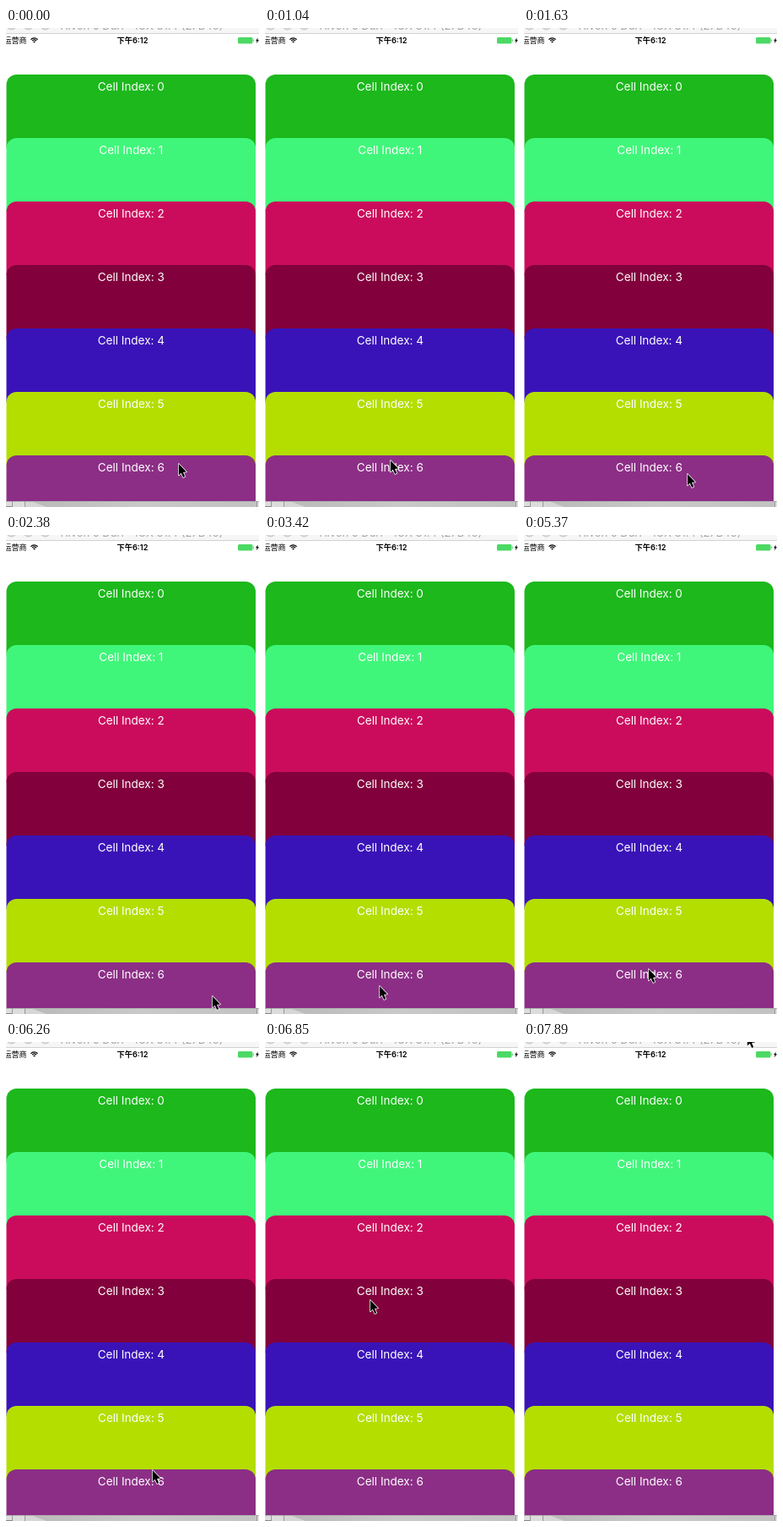
An HTML page with a canvas that plays this animation: 300 px wide and 566 px high, repeating every 8000 ms.

```html
<!DOCTYPE html>
<html lang="zh">
<head>
<meta charset="utf-8">
<style>
html, body { margin: 0; width: 100%; height: 100%; overflow: hidden; background: #fff; }
canvas { display: block; width: 300px; height: 566px; }
</style>
</head>
<body>
<canvas id="stage"></canvas>
<script>
const W = 300, H = 566, LOOP = 8000;
const canvas = document.getElementById('stage');
const ctx = canvas.getContext('2d');
const ratio = window.devicePixelRatio || 1;
canvas.width = W * ratio;
canvas.height = H * ratio;
ctx.scale(ratio, ratio);

const CELLS = ['#1cb81c', '#40f67a', '#cb0c5c', '#82003c', '#3a13b8', '#b3de00', '#8c2e86'];
const CELL_TOP = 55, CELL_STEP = 75, SCREEN_END = 559;

// Each move bends from the last point through `via`, in a few hard steps
const HOME = [204, 514];
const MOVES = [
  { from: 750, until: 1040, steps: 3, via: [172, 494], to: [148, 510] },
  { from: 1480, until: 1930, steps: 4, via: [190, 525], to: [244, 544] },
  { from: 2980, until: 3420, steps: 4, via: [200, 550], to: [135, 532] },
  { from: 4770, until: 5670, steps: 7, via: [124, 518], to: [167, 504] },
  { from: 6260, until: 6260, steps: 1, via: [170, 504], to: [173, 505] },
  { from: 6410, until: 7300, steps: 7, via: [40, 300], to: [262, -40] },
  { from: 7890, until: 7890, steps: 1, via: [263, -25], to: [264, -10] }
];

function pointerAt(t) {
  let pos = HOME;
  for (const { from, until, steps, via, to } of MOVES) {
    if (t < from) break;
    const pace = (until - from) / (steps - 1) || 1;
    const done = Math.min(steps, Math.floor((t - from) / pace + 1e-6) + 1);
    const u = done / steps, v = 1 - u;
    pos = pos.map((p, i) => Math.round(v * v * p + 2 * u * v * via[i] + u * u * to[i]));
  }
  return pos;
}

function rect(x, y, w, h, color) {
  ctx.fillStyle = color;
  ctx.fillRect(x, y, w, h);
}

function disc(x, y, r, color) {
  ctx.fillStyle = color;
  ctx.beginPath();
  ctx.arc(x, y, r, 0, Math.PI * 2);
  ctx.fill();
}

function roundRect(x, y, w, h, r, color) {
  ctx.beginPath();
  ctx.roundRect(x, y, w, h, r);
  ctx.fillStyle = color;
  ctx.fill();
}

function polygon(points, color) {
  ctx.beginPath();
  points.forEach(([x, y]) => ctx.lineTo(x, y));
  ctx.closePath();
  ctx.fillStyle = color;
  ctx.fill();
}

function label(text, x, y, font, color, align = 'left') {
  ctx.font = font;
  ctx.fillStyle = color;
  ctx.textAlign = align;
  ctx.fillText(text, x, y);
}

function drawTitleBar() {
  rect(0, 0, W, 6, '#f6f6f6');
  rect(0, 6, W, 1, '#d2d2d2');
  for (let i = 0; i < 3; i++) {
    disc(6.5 + i * 20, -3.5, 6, '#c6c6c6');
    disc(6.5 + i * 20, -3.5, 5, '#dedede');
  }
  label('Tilvon 5 Duri – lOX 31.4 (27B46)', 62, 1.5, '13px Inter, sans-serif', '#a6a6a6');
}

function drawWifi(x, y) {
  ctx.strokeStyle = ctx.fillStyle = '#000';
  ctx.lineWidth = 1.3;
  for (const r of [3.4, 5.6]) {
    ctx.beginPath();
    ctx.arc(x, y, r, -Math.PI * 0.76, -Math.PI * 0.24);
    ctx.stroke();
  }
  ctx.beginPath();
  ctx.moveTo(x, y);
  ctx.arc(x, y, 1.8, -Math.PI * 0.78, -Math.PI * 0.22);
  ctx.fill();
}

function drawStatusBar() {
  const cjk = '"Noto Sans CJK SC", "Noto Sans CJK", sans-serif';
  label('运营商', -2.5, 18, '500 9px ' + cjk, '#000');
  drawWifi(33.5, 17.5);
  label('下午6:12', 150, 18, '600 9.2px Inter, ' + cjk, '#000', 'center');
  roundRect(275, 11, 17.5, 7.5, 1.5, '#4cd964');
  rect(292.8, 13.4, 1, 2.8, '#4cd964');
  polygon([[298.8, 11.4], [296, 15.2], [297.7, 15.2], [296.9, 18.2], [300, 14.2], [298.3, 14.2]], '#000');
}

function drawCells() {
  ctx.save();
  ctx.beginPath();
  ctx.rect(0, 7, W, SCREEN_END - 7);
  ctx.clip();
  CELLS.forEach((color, i) => {
    const y = CELL_TOP + i * CELL_STEP;
    roundRect(0.5, y, 295.5, 97, 12, color);
    label('Cell Index: ' + i, 148.3, y + 19, '13.5px Inter, sans-serif', '#fff', 'center');
  });
  ctx.restore();
}

function drawDesk() {
  const y = SCREEN_END, h = H - SCREEN_END;
  rect(0, y, W, h, '#dcdcdc');
  const shade = ctx.createLinearGradient(22, 0, 297, 0);
  shade.addColorStop(0, '#b9b9b9');
  shade.addColorStop(0.5, '#c9c9c9');
  shade.addColorStop(1, '#c2c2c2');
  rect(22, y, 275, h, shade);
  polygon([[23, y + 1], [32, y + 1], [48, H], [23, H]], '#d6d6d6');
  rect(0, y, W, 1, '#b0b0b0');
  rect(0, H - 1, 8, 1, '#888');
  for (const x of [7, 22, 297]) rect(x, y, 1, h, '#989898');
}

function drawPointer([x, y]) {
  ctx.save();
  ctx.translate(x, y);
  const arrow = [[0.8, 1], [0.8, 14.4], [3.8, 11.7], [6.1, 17], [8.2, 16.1], [6, 10.9], [10, 10.5]];
  polygon(arrow, '#000');
  ctx.lineJoin = 'round';
  ctx.lineWidth = 1.5;
  ctx.strokeStyle = '#fff';
  ctx.stroke();
  polygon(arrow, '#000');
  ctx.restore();
}

function draw(t) {
  rect(0, 0, W, H, '#fff');
  drawTitleBar();
  drawStatusBar();
  drawCells();
  drawDesk();
  drawPointer(pointerAt(t));
}

const start = performance.now();
function tick() {
  draw((performance.now() - start) % LOOP);
  requestAnimationFrame(tick);
}
tick();
</script>
</body>
</html>
```
